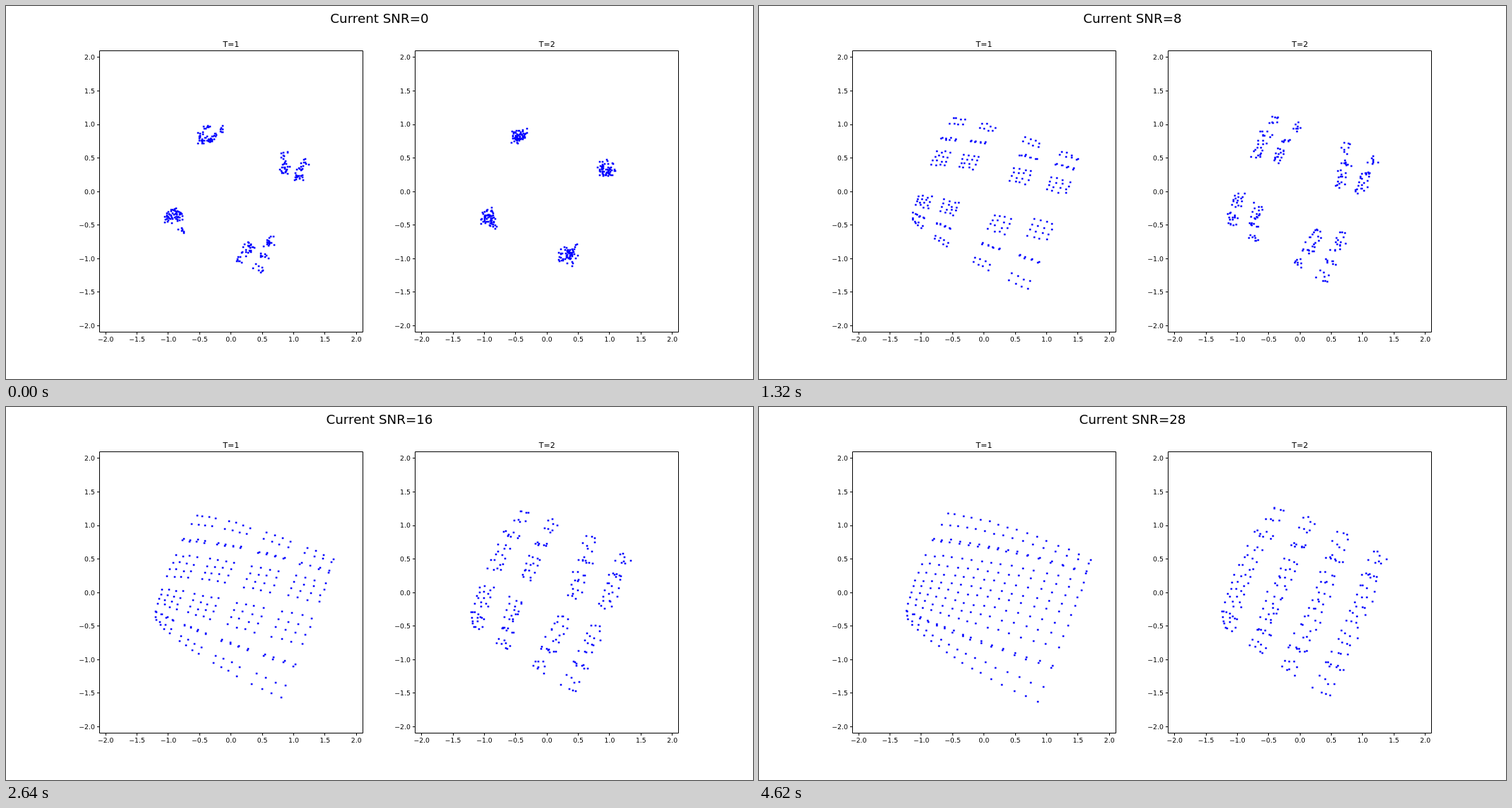
Recreate the animation shown at these times as an HTML page. Size 1058x529 px, loop 4950 ms.

```html
<!DOCTYPE html>
<html lang="en">
<head>
<meta charset="utf-8">
<title>Constellation against SNR</title>
<style>
html, body { margin: 0; width: 100%; height: 100%; overflow: hidden; background: #fff; }
svg { display: block; width: 1058px; height: 529px; font: 9.3px "DejaVu Sans", sans-serif; }
.axes { fill: none; stroke: #000; }
.dots { fill: #00f; }
.name { font-size: 11px; }
#title { font-size: 18.3px; }
</style>
</head>
<body>
<svg id="stage" viewBox="0 0 1058 529"><text id="title" x="529" y="24.3" text-anchor="middle"></text></svg>
<script>
const STEP = 330, STEPS = 15, MAX_SNR = 28;
const MID_Y = 263.2, UNIT_X = 88.75, UNIT_Y = 95.15, LIMIT = 2.1;

// sheet: 3 x 3 key points of the fully opened 16 x 16 grid.
// knots: the four quadrant centres that the grid grows out of.
const panels = [
  {
    name: 'T=1', midX: 318.7, spread: 1, jitter: 1, pull: .57, rate: 6,
    knots: [[-.35, .88], [.95, .36], [-.93, -.37], [.3, -.95]],
    sheet: [
      [[-.58, 1.18], [.45, .95], [1.69, .49]],
      [[-1.1, .15], [0, 0], [1.42, -.27]],
      [[-1.22, -.4], [-.41, -1], [.85, -1.62]]
    ]
  },
  {
    name: 'T=2', midX: 766.2, spread: .5, jitter: 3.5, pull: .82, rate: 8,
    knots: [[-.45, .82], [.95, .33], [-.93, -.4], [.32, -.94]],
    sheet: [
      [[-.53, 1.3], [.42, .98], [1.46, .46]],
      [[-1.15, .27], [-.04, -.09], [1.1, -.48]],
      [[-1.32, -.4], [-.45, -1], [.56, -1.6]]
    ]
  }
];

const stage = document.getElementById('stage');
const title = document.getElementById('title');

function add(tag, attrs, text = '') {
  const el = document.createElementNS('http://www.w3.org/2000/svg', tag);
  for (const key in attrs) el.setAttribute(key, attrs[key]);
  el.textContent = text;
  return stage.appendChild(el);
}

function noise(seed) {
  const v = Math.sin(seed * 12.9898) * 43758.5453;
  return (v - Math.floor(v)) * 2 - 1;
}

// Parabola through three points, t from 0 to 1.
const curve = ([a, b, c], t) => a.map((_, i) =>
  a[i] * (2 * t - 1) * (t - 1) + b[i] * 4 * t * (1 - t) + c[i] * t * (2 * t - 1));

// Point of the sheet at a column and row, both from 0 to 15.
const onSheet = (p, col, row) => curve(p.sheet.map(line => curve(line, col / 15)), row / 15);

// Clusters are 4 columns wide; rows fall into groups of 2, 2, 4, 4, 2, 2.
function buildPoints(p) {
  p.points = [];
  let firstRow = 0;
  [2, 2, 4, 4, 2, 2].forEach((size, group) => {
    const midRow = firstRow + (size - 1) / 2;
    const pinch = group % 3 === 1 ? .2 : 1;
    for (let row = firstRow; row < firstRow + size; row++) {
      for (let col = 0; col < 16; col++) {
        const midCol = Math.floor(col / 4) * 4 + 1.5;
        const centre = onSheet(p, midCol, midRow);
        const full = onSheet(p, midCol + (col - midCol) * p.spread, midRow + (row - midRow) * pinch);
        const knot = p.knots[(col > 7) + 2 * (row > 7)];
        const inner = Math.hypot(...centre) < Math.hypot(...knot);
        const seed = p.points.length + 1;
        p.points.push({ centre, full, knot, inner, shake: [noise(seed), noise(seed + 400)] });
      }
    }
    firstRow += size;
  });
}

function buildAxes(p) {
  const snap = v => Math.floor(v) + .5;
  const left = snap(p.midX - LIMIT * UNIT_X), right = snap(p.midX + LIMIT * UNIT_X);
  const top = 63.5, bottom = 462.5;
  let d = `M${left} ${top}H${right}V${bottom}H${left}Z`;
  for (let v = -2; v <= 2; v += .5) {
    const x = p.midX + v * UNIT_X, y = MID_Y - v * UNIT_Y;
    const label = v.toFixed(1).replace('-', '\u2212');
    d += `M${snap(x)} ${bottom}v3.5M${left} ${snap(y)}h-3.5`;
    add('text', { x, y: 476.4, 'text-anchor': 'middle' }, label);
    add('text', { x: left - 6.6, y: y + 3.4, 'text-anchor': 'end' }, label);
  }
  add('path', { class: 'axes', d });
  add('text', { class: 'name', x: p.midX, y: 58.3, 'text-anchor': 'middle' }, p.name);
  p.dots = add('path', { class: 'dots' });
}

// Clusters leave their knot, the inner ones later, while each one opens.
function drawDots(p, snr) {
  const grow = 1.02 - p.pull * Math.exp(-snr / p.rate);
  const open = .12 + .88 * Math.sin(snr / MAX_SNR * Math.PI / 2);
  const shake = p.jitter + 4 * Math.exp(-snr / 3);
  p.dots.setAttribute('d', p.points.map(({ centre, full, knot, inner, shake: s }) => {
    const g = inner ? grow * grow : grow;
    const [px, py] = centre.map((c, i) => knot[i] + (c - knot[i]) * g + (full[i] - c) * open);
    const x = Math.round(p.midX + px * UNIT_X + s[0] * shake);
    const y = Math.round(MID_Y - py * UNIT_Y + s[1] * shake);
    return `M${x - 1.3} ${y - 1.3}h2.6v2.6h-2.6z`;
  }).join(''));
}

for (const p of panels) {
  buildPoints(p);
  buildAxes(p);
}

const start = performance.now();
let shown = -1;

function tick() {
  const step = Math.floor((performance.now() - start) / STEP) % STEPS;
  if (step !== shown) {
    shown = step;
    title.textContent = 'Current SNR=' + 2 * step;
    for (const p of panels) drawDots(p, 2 * step);
  }
  requestAnimationFrame(tick);
}
tick();
</script>
</body>
</html>
```
